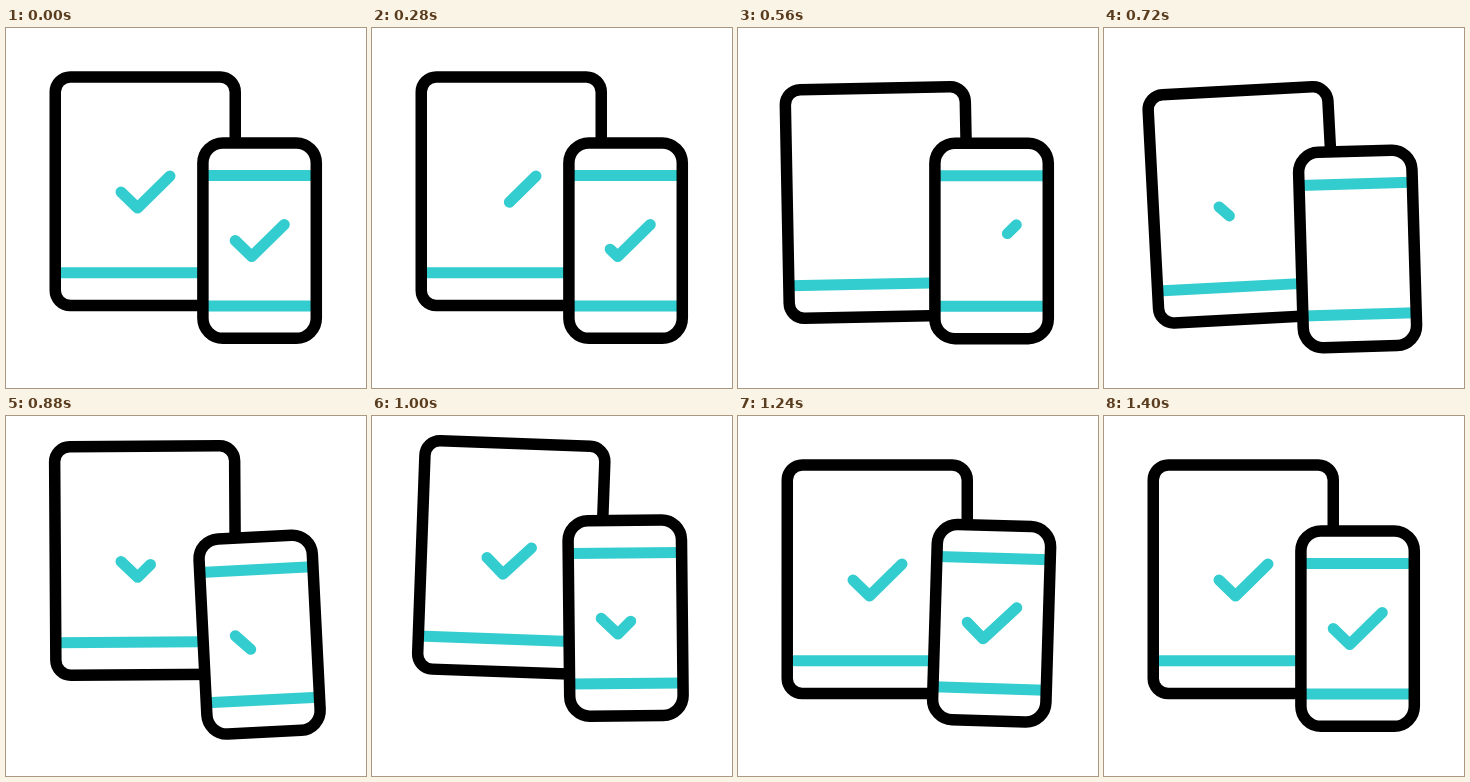
An HTML page for the animation above (1.64 s loop, 360x360 px).

```html
<!DOCTYPE html>
<html lang="en">
<head>
<meta charset="utf-8">
<title>Devices</title>
<style>
  html, body { margin: 0; width: 100%; height: 100%; overflow: hidden; background: #fff; }
  svg { display: block; width: 100%; height: 100%; }
  rect, path { fill: none; stroke-width: 11.5; }
  .body { fill: #fff; }
  .frame { stroke: #000; }
  .bar, .check { stroke: #33cccf; stroke-width: 11; }
  .check { stroke-linecap: round; stroke-linejoin: round; }
</style>
</head>
<body>
<svg viewBox="0 0 360 360">
  <g id="tablet">
    <rect class="body" x="49.25" y="49" width="180" height="228.5" rx="15"/>
    <path class="bar" d="M50 244.8H229"/>
    <path class="check" pathLength="1" d="M115 164L131.5 180L164 148"/>
    <rect class="frame" x="49.25" y="49" width="180" height="228.5" rx="15"/>
  </g>
  <g id="phone">
    <rect class="body" x="196.9" y="114.9" width="113.4" height="195.4" rx="20"/>
    <path class="bar" d="M198 147.5H309M198 278H309"/>
    <path class="check" pathLength="1" d="M229.2 212.5L245.7 228.5L278.3 196.5"/>
    <rect class="frame" x="196.9" y="114.9" width="113.4" height="195.4" rx="20"/>
  </g>
</svg>
<script>
const LOOP = 1640, STEP = 40;

// [time, value] keys, sine eased in between
const SHIFT = [[400, 0], [640, 15], [690, 15], [940, -24], [1230, 0]];
const TILT = [[460, 0], [700, -3], [720, -3], [1040, 2.3], [1250, 0]];

const devices = [
  { id: 'tablet', cx: 139.25, cy: 163.3, lag: 0, checkLag: 0, travel: 1 },
  { id: 'phone', cx: 253.6, cy: 212.6, lag: 130, checkLag: 120, travel: 0.62 },
];
for (const d of devices) {
  d.group = document.getElementById(d.id);
  d.check = d.group.querySelector('.check');
}

const progress = (t, from, to) => Math.min(1, Math.max(0, (t - from) / (to - from)));
const ease = p => (1 - Math.cos(Math.PI * p)) / 2;

function valueAt(keys, t) {
  let value = keys[0][1];
  for (let i = 1; i < keys.length; i++) {
    const [t0, v0] = keys[i - 1], [t1, v1] = keys[i];
    value += (v1 - v0) * ease(progress(t, t0, t1));
  }
  return value;
}

// The tick is wiped from its start, then written again.
function drawCheck(check, t) {
  const redraw = t > 640;
  const start = redraw ? 0 : progress(t, 80, 520);
  const end = redraw ? progress(t, 640, 1040) : 1;
  check.style.visibility = end - start > 0.001 ? 'visible' : 'hidden';
  check.setAttribute('stroke-dasharray', `${end - start} 2`);
  check.setAttribute('stroke-dashoffset', -start);
}

function render(now) {
  const t = Math.floor((now % LOOP) / STEP) * STEP;
  for (const d of devices) {
    const dy = valueAt(SHIFT, t - d.lag) * d.travel;
    const angle = valueAt(TILT, t - d.lag);
    d.group.setAttribute('transform', `translate(0 ${dy}) rotate(${angle} ${d.cx} ${d.cy})`);
    drawCheck(d.check, t - d.checkLag);
  }
}

const begin = performance.now();
function tick() {
  render(performance.now() - begin);
  requestAnimationFrame(tick);
}
tick();
</script>
</body>
</html>
```
